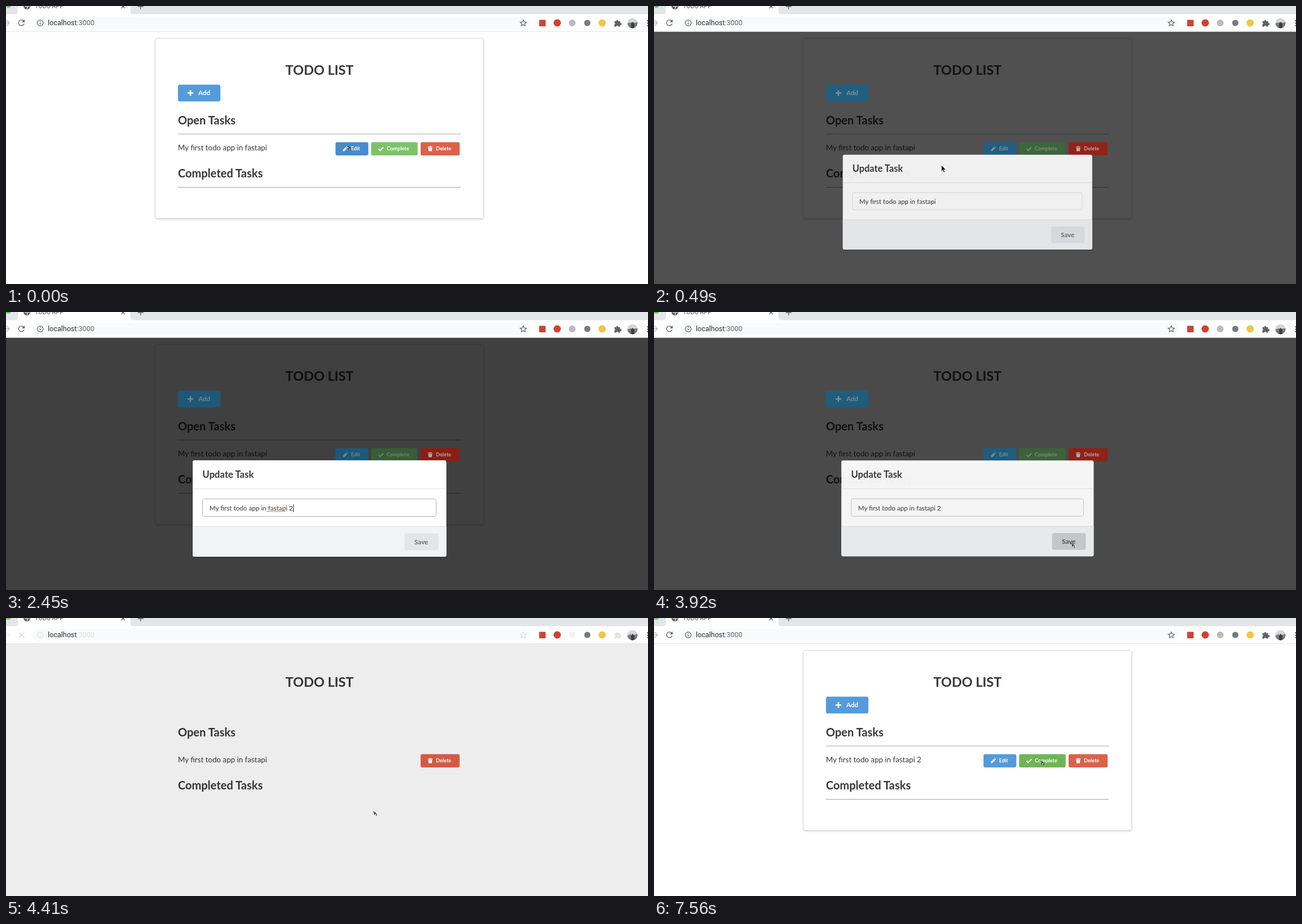
Recreate the animation shown at these times as an HTML page. Size 1135 px wide and 493 px high, loop 8 s.

```html
<!DOCTYPE html>
<html lang="en">
<head>
<meta charset="utf-8">
<title>Todo app</title>
<style>
  html, body { margin: 0; width: 100%; height: 100%; overflow: hidden; background: #fff; }
  svg { display: block; width: 1135px; height: 493px; }
  text { font-family: Lato, sans-serif; fill: #363636; white-space: pre; }
  .bold { font-weight: 700; }
  .h1 { font-size: 23.33px; }
  .h2 { font-size: 20px; }
  .h3 { font-size: 16.66px; }
  .task { font-size: 13.33px; }
  .body { font-size: 11.66px; }
  .mini { font-size: 9.17px; }
  .url { font: 12.5px Roboto, sans-serif; fill: #2b2d30; }
  .tab { font: 10.6px Roboto, sans-serif; fill: #4b4e52; }
  .port { fill: #64686c; }
  .line { fill: none; stroke: #5f6368; stroke-width: 1.4; }
  .btn { --p: 0%; }
  .btn rect { fill: color-mix(in srgb, var(--lit), var(--dim) var(--p)); }
  .btn text, .btn .glyph { fill: color-mix(in srgb, #fff, var(--ink) var(--p)); }
  .btn .stroke { fill: none; stroke: color-mix(in srgb, #fff, var(--ink) var(--p)); }
  .blue { --lit: #539bda; --dim: #1d5878; --ink: #71868f; }
  .green { --lit: #7cc368; --dim: #375d38; --ink: #738371; }
  .red { --lit: #dc614a; --dim: #8b1d15; --ink: #b5a5a2; }
  .blue.hover { --lit: #468bcb; }
  .green.hover { --lit: #70b456; }
  .hidden { display: none; }
  .loading .faint { opacity: .18; }
</style>
</head>
<body>
<svg viewBox="0 0 1135 493">
  <defs>
    <filter id="soft" x="-10%" y="-10%" width="120%" height="125%">
      <feDropShadow dx="0" dy="1.5" stdDeviation="1.5" flood-opacity=".16"/>
    </filter>
    <clipPath id="face"><circle cx="1107.500" cy="30.500" r="9"/></clipPath>
  </defs>
  <rect width="1135" height="493" fill="#fff"/>

  <g id="card">
    <rect x="264" y="57.500" width="580.500" height="319" rx="3.500" fill="#fff" stroke="#dadadb" filter="url(#soft)"/>
  </g>
  <path id="rules" d="M304 227H804M304 321.500H804" stroke="#a3a3a3"/>
  <text class="bold h1" x="554.300" y="121.500" text-anchor="middle">TODO LIST</text>
  <text class="bold h2" x="304" y="209.500">Open Tasks</text>
  <text class="task" id="task" x="304" y="255.500"></text>
  <text class="bold h2" x="304" y="304">Completed Tasks</text>

  <rect id="dimmer" y="45" width="1135" height="448"/>

  <g id="early">
    <g class="btn blue">
      <rect x="304" y="139.500" width="75" height="29.700" rx="3.500"/>
      <path class="stroke" stroke-width="2.600" d="M321 154.300h10M326 149.300v10"/>
      <text class="bold body" x="340" y="158.300">Add</text>
    </g>
    <g class="btn blue" id="edit">
      <rect x="582.500" y="241.500" width="58" height="23.500" rx="3"/>
      <path class="glyph" d="M595.500 257.500l.6-3 4.500-4.500 2.400 2.400-4.500 4.500zM601.300 249.300l1-1 2.400 2.400-1 1z"/>
      <text class="bold mini" x="610" y="256.300">Edit</text>
    </g>
    <g class="btn green" id="complete">
      <rect x="645.500" y="241.500" width="82.300" height="23.500" rx="3"/>
      <path class="stroke" stroke-width="1.900" d="M658.500 253.300l3 3 5.800-5.800"/>
      <text class="bold mini" x="673.300" y="256.300">Complete</text>
    </g>
  </g>
  <g class="btn red">
    <rect x="733" y="241.500" width="69" height="23.500" rx="3"/>
    <path class="glyph" d="M745.800 249.500h2.400l.7-1h2.200l.7 1h2.400v1.300h-8.400zM746.500 251.500h7l-.5 6h-6z"/>
    <text class="bold mini" x="760" y="256.300">Delete</text>
  </g>

  <g id="modal">
    <rect x="330" y="263" width="448.500" height="171" rx="3.300" fill="#fff" filter="url(#soft)"/>
    <path id="footer" d="M330 380.500h448.500v50.200a3.300 3.300 0 0 1-3.300 3.300h-441.900a3.300 3.300 0 0 1-3.300-3.300z"/>
    <path d="M330 313.500h448.500M330 380.500h448.500" stroke="#e2e3e4"/>
    <text class="bold h3" x="347.300" y="294.300">Update Task</text>
    <rect id="field" x="347.500" y="331.500" width="413" height="31" rx="3" fill="#fff"/>
    <text class="body" id="entry" x="359.800" y="351.800"></text>
    <g id="focus">
      <path d="M461 353.800H494" stroke="#d5453f" stroke-width="1.500" stroke-dasharray="1.500 1.300"/>
      <rect id="caret" y="341" width="1" height="14" fill="#222"/>
    </g>
    <rect id="save" x="704.500" y="392.500" width="60" height="30" rx="3.300"/>
    <text class="bold body" id="saveText" x="734.200" y="411.500" text-anchor="middle">Save</text>
  </g>

  <g id="browser">
    <rect width="1135" height="45" fill="#fff"/>
    <path d="M0 0H21V10Q21 14.500 16 14.500H0zM220 0H1135V14.500H225Q220 14.500 220 10z" fill="#e3e5e9"/>
    <path d="M0 45.300H1135" stroke="#e3e4e6"/>
    <circle cx="4" cy="-3" r="6" fill="#62c554"/>
    <circle cx="37" cy="0" r="6" fill="#54575b"/>
    <path d="M33 1l3-1 2 2-1 3M38 0l4 1" fill="none" stroke="#fff" stroke-width="1.200"/>
    <text class="tab" x="51" y="4.300">TODO APP</text>
    <path class="line" d="M204 -2l6 6M210 -2l-6 6M233 1h10M238 -4v10"/>
    <rect x="47" y="19" width="881" height="22" rx="11" fill="#f9fafb"/>
    <path class="line faint" d="M-4 30H6M1 25l5 5-5 5" style="stroke:#b8babd"/>
    <g id="reload">
      <path class="line" d="M31.200 26.800A5 5 0 1 0 32 31.500"/>
      <path d="M33 24v5h-5z" fill="#5f6368"/>
    </g>
    <path id="stop" class="line" d="M23 25.500l9 9M32 25.500l-9 9" style="stroke:#d3d5d7"/>
    <g class="faint">
      <circle class="line" cx="60.500" cy="30" r="5.200" style="stroke-width:1.200"/>
      <path class="line" d="M60.500 29.500v3.500M60.500 26.800v1.400"/>
    </g>
    <text class="url" x="74" y="34.300">localhost<tspan class="port faint">:3000</tspan></text>
    <path class="line faint" style="stroke-width:1.200" d="M914.500 24.800l1.600 3.500 3.900.4-2.900 2.600.8 3.800-3.400-2-3.400 2 .8-3.800-2.900-2.600 3.900-.4z"/>
    <rect x="942.500" y="24.500" width="11.500" height="11.500" rx="1" fill="#cb4436"/>
    <circle cx="974.500" cy="30" r="6.500" fill="#cf4133"/>
    <circle class="faint" cx="1001" cy="30" r="6" fill="#b9bbbd"/>
    <circle cx="1027.700" cy="30" r="5.500" fill="#777a7d"/>
    <circle cx="1054" cy="30" r="6.500" fill="#eec744"/>
    <path class="faint" fill="#5f6368" d="M1075.500 27h3.200a2 2 0 1 1 4 0h3v3.200a2 2 0 1 1 0 3.700v2.600h-3.200a2 2 0 0 0-3.800 0h-3.200v-3.500a2 2 0 0 0 0-3.800z"/>
    <g clip-path="url(#face)">
      <rect x="1098" y="21" width="20" height="20" fill="#d3d5d6"/>
      <path d="M1098 31l7-2 5 1 8-2v13h-20z" fill="#787c7e"/>
      <path d="M1105 40v-8l3-4 3 4v8z" fill="#3d4042"/>
    </g>
    <path d="M1134.500 25v11" stroke="#5f6368" stroke-width="2.400" stroke-dasharray="2.400 2"/>
  </g>

  <g id="cursor">
    <path id="arrow" d="M0 0V11.500L2.600 9.200 4.400 13.300 6.400 12.400 4.600 8.500H8.200z" fill="#111" stroke="#fff" stroke-width=".9"/>
    <path id="hand" d="M-1 1.200Q.5-.6 1.700 1.200V5.300Q3-.1+4.500 4.300 5.500 5.500 5 6.500 4.500 7.300 5 7.300 8Q7.600 11.500 5.600 14.500H0Q-1.300 11.500-4 9.200-4.200 7-1 8.700z" fill="#fff" stroke="#111" stroke-width="1.100" stroke-linejoin="round"/>
    <path id="beam" d="M-2.500 -6.500Q0 -6.500 0 -4.500 0 -6.500 2.500 -6.500M0 -4.500V5.500M-2.500 7.500Q0 7.500 0 5.500 0 7.500 2.500 7.500" fill="none" stroke="#222"/>
  </g>
</svg>
<script>
const LOOP = 8000, STEP = 70;
const TASK = 'My first todo app in fastapi';
const $ = id => document.getElementById(id);
const show = (id, on) => $(id).classList.toggle('hidden', !on);
const fill = (id, color) => $(id).setAttribute('fill', color);
const clamp = v => Math.min(1, Math.max(0, v));
const between = (t, from, to) => t >= from && t < to;
const buttons = document.querySelectorAll('.btn');

// [time, x, y, shape used until the next key]
const path = [
  [0, 604.5, 249, 'hand'], [350, 604, 248, 'arrow'], [420, 570, 262, 'arrow'],
  [490, 508, 282, 'arrow'], [630, 501, 334, 'beam'], [840, 500, 347, 'beam'],
  [1190, 500, 347, ''], [2450, 500, 347, ''], [2520, 508, 350, 'beam'],
  [2730, 590, 370, 'arrow'], [3010, 715, 402, 'hand'], [3220, 738, 410.5, 'hand'],
  [4130, 738, 410.5, 'hand'], [4410, 650, 343.5, 'hand'], [4480, 648, 342, 'arrow'],
  [4690, 641, 338, 'arrow'], [5600, 641, 338, 'arrow'], [5740, 638, 302, 'arrow'],
  [6230, 642, 298, 'arrow'], [6790, 642, 298, 'arrow'], [7210, 668, 268, 'arrow'],
  [7280, 673, 262, 'hand'], [7560, 684, 253.5, 'hand'], [LOOP, 684, 253.5, 'hand']
];

// The CSS "ease" curve
function ease(x) {
  x = clamp(x);
  let lo = 0, hi = 1, s = 0;
  for (let i = 0; i < 24; i++) {
    s = (lo + hi) / 2;
    const at = .75 * s * (1 - s) + s ** 3;
    if (at < x) lo = s; else hi = s;
  }
  return .3 * s * (1 - s) ** 2 + 3 * s * s * (1 - s) + s ** 3;
}

function drawCursor(t) {
  const i = path.findIndex((key, n) => t >= key[0] && t < path[n + 1][0]);
  const [t0, x0, y0, shape] = path[i], [t1, x1, y1] = path[i + 1];
  const k = (t - t0) / (t1 - t0);
  $('cursor').setAttribute('transform', `translate(${x0 + (x1 - x0) * k} ${y0 + (y1 - y0) * k})`);
  for (const id of ['arrow', 'hand', 'beam']) show(id, id === shape);
}

function drawModal(t, amount, closing) {
  const scale = 1 - (closing ? .1 : .2) * (1 - amount);
  const focused = between(t, 840, 3780);
  const hover = between(t, 3010, 4410);
  show('modal', amount > 0 && t < 4410);
  $('modal').setAttribute('opacity', amount);
  $('modal').setAttribute('transform',
    `translate(554.2 304) scale(${scale}) translate(-554.2 -304)`);
  fill('footer', amount < 1 ? '#f2f3f4' : '#fdfdfe');
  fill('save', hover ? '#cdcecf' : '#e3e5e8');
  $('saveText').style.fill = hover ? '#4a4a4a' : '#6b6c6e';
  $('field').setAttribute('stroke', focused ? '#aeb2b6' : closing ? '#c9cacb' : '#dfe0e1');
  $('entry').textContent = TASK + (t >= 2170 ? ' 2' : t >= 1750 ? ' ' : '');
  show('focus', focused);
  if (focused) $('caret').setAttribute('x', 360.3 + $('entry').getComputedTextLength());
}

function draw(t) {
  const closing = t >= 3920;
  const amount = closing
    ? 1 - Math.max(.053, ease((t - 4095) / 500))
    : ease((t - 165) / 500);
  const flash = between(t, 4410, 4480);

  $('dimmer').setAttribute('opacity', .75 * amount);
  buttons.forEach(b => b.style.setProperty('--p', amount * 100 + '%'));
  $('edit').classList.toggle('hover', t < 420);
  $('complete').classList.toggle('hover', t >= 7280);
  show('card', !between(t, 210, 420) && !between(t, 3920, 4480));
  show('rules', !between(t, 3920, 4480));
  show('early', !flash);
  $('task').textContent = TASK + (t >= 4970 ? ' 2' : '');

  const loading = between(t, 4340, 4760);
  show('reload', !loading);
  show('stop', loading);
  $('browser').classList.toggle('loading', flash);

  drawModal(t, amount, closing);
  drawCursor(t);
}

function tick() {
  const t = performance.now() % LOOP;
  draw(Math.floor((t + 1) / STEP) * STEP);
  requestAnimationFrame(tick);
}
tick();
</script>
</body>
</html>
```
